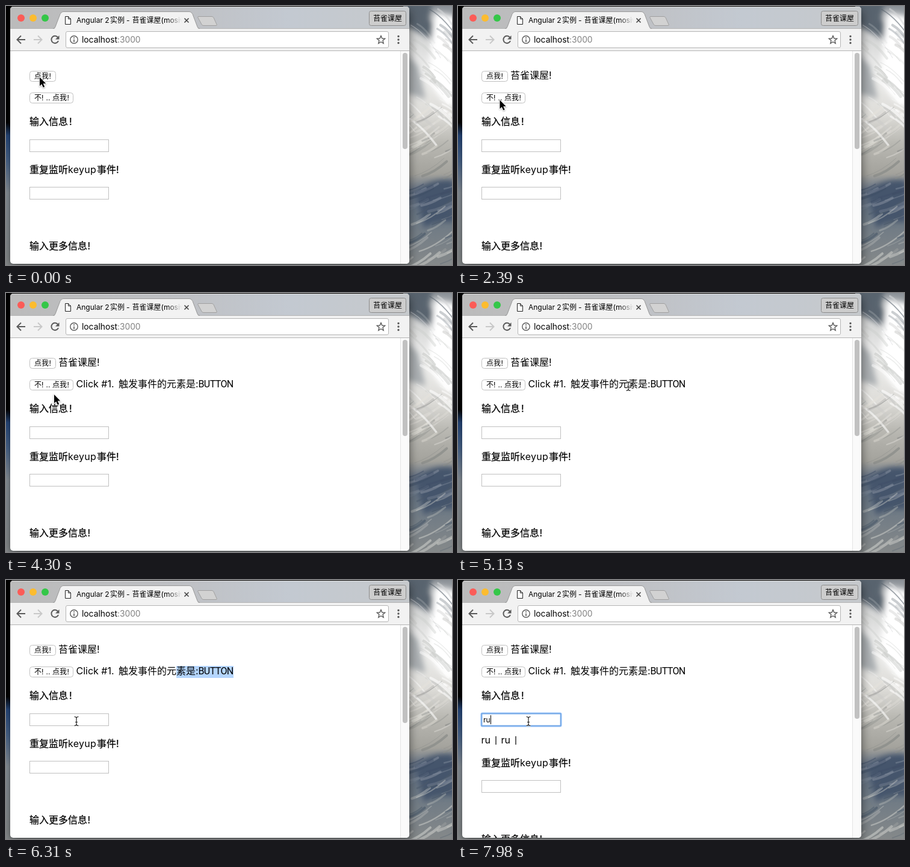
Write an HTML page that moves like this. It is 741x431 px and loops after 8 s.

```html
<!DOCTYPE html>
<html lang="zh-CN">
<head>
<meta charset="utf-8">
<title>Angular 2 实例</title>
<style>
  html, body { margin: 0; width: 100%; height: 100%; overflow: hidden; background: #000; }
  svg { display: block; width: 741px; height: 431px; }
  text { font: 16px Inter, "Noto Sans CJK SC", "Noto Sans CJK", sans-serif; white-space: pre; }
  .bold { stroke: #000; stroke-width: .25px; }
  .small { font-size: 12px; }
  .url { font-size: 13.8px; }
  .box { fill: #fff; stroke: #c0c0c0; }
  .icon { fill: none; stroke: #5a5a5a; stroke-width: 2; }
  .thin { stroke-width: 1.4; }
</style>
</head>
<body>
<svg viewBox="0 0 741 431">
  <defs>
    <linearGradient id="space" x2="0" y2="1">
      <stop offset=".45" stop-color="#000"/>
      <stop offset=".5" stop-color="#274a80"/>
      <stop offset=".6" stop-color="#4d6a92"/>
      <stop offset=".72" stop-color="#8d969f"/>
      <stop offset="1" stop-color="#8b8f90"/>
    </linearGradient>
    <linearGradient id="sky" x2="0" y2="1">
      <stop stop-color="#8a9096"/>
      <stop offset=".1" stop-color="#cfd0d0"/>
      <stop offset=".25" stop-color="#efefee"/>
      <stop offset=".42" stop-color="#dddcd8"/>
      <stop offset=".53" stop-color="#b9b8b2"/>
      <stop offset=".65" stop-color="#a3a29c"/>
      <stop offset=".72" stop-color="#5f6d81"/>
      <stop offset=".82" stop-color="#6c7884"/>
      <stop offset="1" stop-color="#85898a"/>
    </linearGradient>
    <linearGradient id="bar">
      <stop stop-color="#bbb"/>
      <stop offset=".45" stop-color="#bfc1c5"/>
      <stop offset=".7" stop-color="#c3c9d1"/>
      <stop offset="1" stop-color="#c6c9cc"/>
    </linearGradient>
    <linearGradient id="fade" gradientUnits="userSpaceOnUse" x1="268" x2="292" y1="0" y2="0">
      <stop/><stop offset="1" stop-opacity="0"/>
    </linearGradient>
    <linearGradient id="pressed" x2="0" y2="1">
      <stop stop-color="#6cb3fa"/><stop offset="1" stop-color="#1a7aff"/>
    </linearGradient>
    <filter id="soft"><feGaussianBlur stdDeviation=".6"/></filter>
    <filter id="mist" x="-30%" y="-30%" width="160%" height="160%"><feGaussianBlur stdDeviation="5"/></filter>
    <filter id="shade" x="-10%" y="-10%" width="120%" height="120%"><feGaussianBlur stdDeviation="8"/></filter>
    <filter id="drop" x="-50%" y="-50%" width="200%" height="200%">
      <feDropShadow dx="0" dy="1" stdDeviation=".8" flood-opacity=".4"/>
    </filter>
    <clipPath id="frame"><rect x="7" y="1" width="663" height="428" rx="5"/></clipPath>
    <clipPath id="right"><path d="M660 0h81v431h-81z"/></clipPath>
    <path id="beamPath" d="M-3.5-7.5q3 0 3.5 2 .5-2 3.5-2M0-6V6M-3.5 7.5q3 0 3.5-2 .5 2 3.5 2M-2 1.5h4"/>
  </defs>

  <!-- desktop -->
  <rect width="741" height="431" fill="url(#space)"/>
  <g clip-path="url(#right)">
    <rect x="660" width="81" height="431" fill="url(#sky)"/>
    <g filter="url(#mist)">
      <path d="M660-10h50l-8 30 30 40-25-5-47-25z" fill="#59636e"/>
      <path d="M712 10l40 10v150q-40-10-50-60z" fill="#fff"/>
      <path d="M665 80l20 20 12 55-32-10z" fill="#a9adb0"/>
      <path d="M680 310q25-25 65-20v70q-30-5-50 10z" fill="#45546c"/>
    </g>
    <g id="clouds" filter="url(#soft)" fill="none" stroke-linecap="round"></g>
  </g>
  <rect x="7" y="8" width="663" height="425" filter="url(#shade)" opacity=".55"/>

  <!-- browser window -->
  <g clip-path="url(#frame)">
    <path d="M7 0h663v431H7z" fill="#fff"/>
    <path d="M7 1h663v37H7z" fill="url(#bar)"/>
    <path d="M7 1.5h663" stroke="#d6d6d6"/>
    <path d="M7 38h663v36H7z" fill="#f2f2f2"/>
    <path d="M7 37.5h663M7 74.5h663" stroke="#b4b4b4"/>
    <path d="M78 38.5q3 0 4-3l8-22q2-4 5-4h210q3 0 5 4l8 22q1 3 4 3z" fill="#f2f2f2"/>
    <path d="M78 37.5q3 0 4-3l8-21q2-4 5-4h210q3 0 5 4l8 21q1 3 4 3" fill="none" stroke="#999"/>
    <path d="M320 17.5h22q2 0 3 2l5 11q1 2-1 2h-21q-2 0-3-2l-6-11q-1-2 1-2z" fill="#d2d2d2" stroke="#a0a0a0"/>
    <circle cx="25" cy="20" r="6" fill="#fb5c57"/>
    <circle cx="45" cy="20" r="6" fill="#fcbc2f"/>
    <circle cx="65" cy="20" r="6" fill="#34c748"/>
    <path d="M98.5 17.5h5l4 4v9h-9zM103.5 17.5v4h4" fill="#fff" stroke="#222"/>
    <text class="small" y="28" fill="url(#fade)"><tspan x="117">Angular 2</tspan><tspan x="173">实例</tspan><tspan x="200">-</tspan><tspan x="209.5">苔雀课屋(mosivo</tspan></text>
    <path d="M296.5 20.5l7 7m0-7l-7 7" stroke="#444" stroke-width="1.6"/>
    <rect x="603.5" y="8.5" width="61" height="24" rx="3" fill="#cdcdcd" stroke="#8c8c8c"/>
    <text class="small" x="610" y="25">苔雀课屋</text>

    <path class="icon" d="M32 56H19M25 49.5L18.5 56l6.5 6.5"/>
    <path class="icon" d="M46 56h13M53 49.5l6.5 6.5-6.5 6.5" style="stroke:#c8c8c8"/>
    <path class="icon" d="M86 52a6 6 0 1 0 1 6"/>
    <path d="M88.5 49v6.5H82z" fill="#5a5a5a"/>
    <rect x="99.5" y="42.5" width="536" height="27" rx="2.5" fill="#fff" stroke="#b5b5b5"/>
    <circle class="icon thin" cx="113" cy="56" r="6.2"/>
    <path d="M113 52v2M113 55.5v4.5" stroke="#5a5a5a" stroke-width="1.6"/>
    <text class="url" x="126" y="61">localhost<tspan fill="#808080">:3000</tspan></text>
    <path class="icon thin" d="M623 49.5l1.9 4.5 4.8.4-3.7 3.1 1.2 4.8-4.2-2.6-4.2 2.6 1.2-4.8-3.7-3.1 4.8-.4z"/>
    <path d="M652 50.5h0M652 56h0M652 61.5h0" stroke="#5a5a5a" stroke-width="3.4" stroke-linecap="round"/>

    <!-- page -->
    <path d="M656 75h14v354h-14z" fill="#fafafa"/>
    <path d="M655.5 75v354" stroke="#e4e4e4"/>
    <rect id="thumb" x="659" y="78" width="8" height="160" rx="4" fill="#c1c1c1"/>

    <rect id="button1" class="box" x="39.5" y="108.5" width="43" height="17" rx="4"/>
    <text class="small" y="121"><tspan x="47">点我</tspan><tspan x="71.5">!</tspan></text>
    <text id="reply1" y="121"><tspan x="87">苔雀课屋</tspan><tspan x="151">!</tspan></text>

    <rect id="button2" class="box" x="39.5" y="144.5" width="72" height="17" rx="4"/>
    <text class="small" y="157"><tspan x="47">不!</tspan><tspan x="66.5">..</tspan><tspan x="77">点我</tspan><tspan x="101.5">!</tspan></text>
    <rect id="selection" x="283" y="143" height="20" fill="#b4d5fe"/>
    <text id="reply2" y="156.5"><tspan x="116.5">Click #1.</tspan><tspan x="187">触发事件的元素是</tspan><tspan x="315">:</tspan><tspan x="319.5" font-family="Roboto, sans-serif" letter-spacing="-.6">BUTTON</tspan></text>

    <text class="bold" y="198"><tspan x="39">输入信息</tspan><tspan x="105">!</tspan></text>
    <rect class="box" x="39.5" y="222.5" width="131" height="20"/>
    <rect id="ring" x="39" y="222" width="132" height="21" rx="1.5" fill="none" stroke="#4a96f0" stroke-opacity=".65" stroke-width="3"/>
    <text id="typed" class="small" x="42" y="237"></text>
    <path id="caret" d="M.5 225v15" stroke="#000"/>
    <text id="echo" y="272"><tspan x="38.5">ru</tspan><tspan x="71.5">ru</tspan></text>
    <path id="pipes" d="M63 260v14M96 260v14" stroke="#111" stroke-width="1.3"/>

    <g id="below">
      <text class="bold" y="278"><tspan x="39">重复监听</tspan><tspan x="103" stroke="none" letter-spacing=".3">keyup</tspan><tspan x="151">事件</tspan><tspan x="183">!</tspan></text>
      <rect class="box" x="39.5" y="301.5" width="131" height="20"/>
      <text class="bold" y="405"><tspan x="39">输入更多信息</tspan><tspan x="135.5">!</tspan></text>
    </g>
  </g>

  <g id="arrow" filter="url(#drop)">
    <path d="M0 0v14.5l3.3-3 2.5 5.5 2.4-1-2.5-5.5h4.5z" stroke="#fff" stroke-width="1.6" paint-order="stroke"/>
  </g>
  <g id="beam" fill="none">
    <use href="#beamPath" stroke="#fff" stroke-width="3" stroke-opacity=".8"/>
    <use href="#beamPath" stroke="#222" stroke-width="1.2"/>
  </g>
</svg>
<script>
const $ = id => document.getElementById(id);
const show = (id, on) => $(id).style.display = on ? '' : 'none';
const place = (id, x, y) => $(id).setAttribute('transform', `translate(${x} ${y})`);

// Cloud bands from top to bottom: lower edge, light tone, dark tone, slope of the streaks
const bands = [
  [45, '#d4d6d8', '#5b656f', 1.1],
  [190, '#fff', '#cbccca', .9],
  [290, '#e4e2dc', '#888a88', -.6],
  [345, '#8791a0', '#3f4e66', -.4],
  [440, '#c3c5c2', '#4c5a6b', -.6]
];
let seed = 11;
const random = () => (seed = seed * 16807 % 2147483647) / 2147483647;
let streaks = '';
for (let i = 0; i < 120; i++) {
  const x = 650 + random() * 85, y = random() * 440, length = 15 + random() * 40;
  const [, light, dark, slope] = bands.find(band => y <= band[0]);
  streaks += `<path d="M${x} ${y}q${length / 2} ${slope * length * .25} ${length} ${slope * length}"
    stroke="${i % 2 ? light : dark}" stroke-width="${.8 + random() * 4}" opacity="${.2 + random() * .5}"/>`;
}
$('clouds').innerHTML = streaks;

// Pointer stops: time, x, y, text cursor
const stops = [
  [0, 56, 118.5], [1790, 58, 126], [1910, 66, 145], [2030, 73, 159], [2270, 72, 158], [2390, 69.5, 156.5],
  [4300, 80, 169], [4420, 108, 194], [4540, 155, 213], [4660, 202, 208], [4780, 238, 190], [4890, 257, 171],
  [5010, 265, 154, 1], [5130, 283, 155, 1], [5250, 323, 156, 1], [5360, 366, 157, 1], [5480, 401, 157, 1],
  [5720, 316, 194], [5830, 203.5, 224.5], [5950, 180, 229], [6070, 150, 233, 1], [6190, 128, 234, 1],
  [6310, 117, 235, 1]
];

function draw() {
  const t = performance.now() % 8000;
  const during = (from, to = 8000) => t >= from && t < to;
  const [, x, y, isText] = stops.filter(stop => stop[0] <= t).pop();
  show('arrow', !isText);
  show('beam', isText);
  place(isText ? 'beam' : 'arrow', x, y);

  $('button1').style.fill = during(240, 1440) ? 'url(#pressed)' : '';
  $('button2').style.fill = during(3590, 3700) ? 'url(#pressed)' : '';
  show('reply1', during(1440));
  show('reply2', during(3700));

  const selectionEnd = t < 5480 ? Math.min(x, 378) : 378;
  $('selection').setAttribute('width', during(5130, 6430) ? selectionEnd - 283 : 0);

  const word = t < 7740 ? '' : t < 7860 ? 'r' : 'ru';
  $('typed').textContent = word;
  show('ring', during(6430));
  show('caret', during(6430, 6910) || during(7390));
  place('caret', [42, 47, 54][word.length], 0);

  const echoed = during(7980);
  show('echo', echoed);
  show('pipes', echoed);
  place('below', 0, echoed ? 32 : 0);
  $('thumb').setAttribute('height', echoed ? 153 : 160);
  requestAnimationFrame(draw);
}
draw();
</script>
</body>
</html>
```
